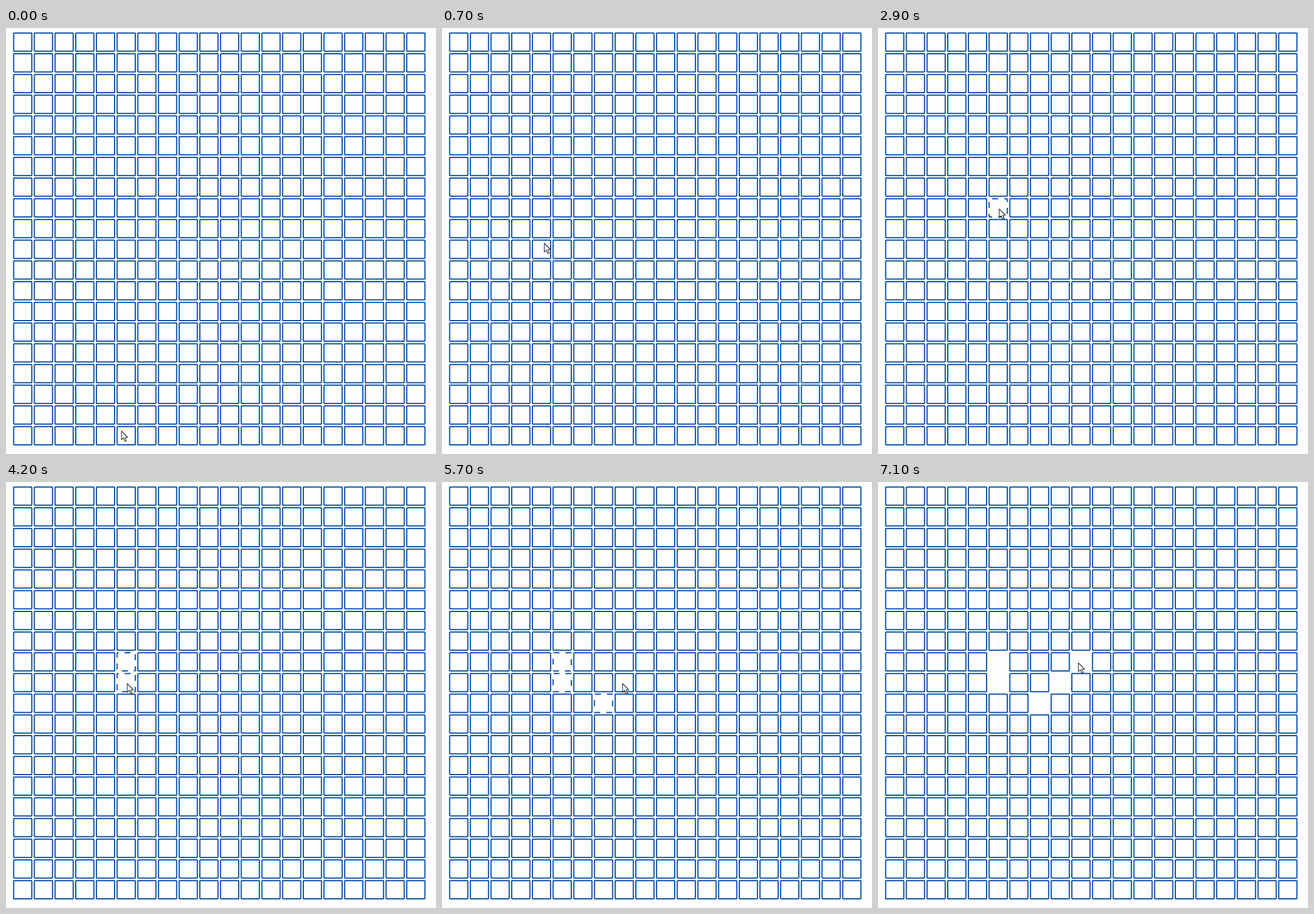
Animation, 752 px wide and 744 px high, one loop 8 s. Source, as an HTML page:

```html
<!DOCTYPE html>
<html lang="en">
<head>
<meta charset="utf-8">
<title>Cell grid</title>
<style>
  html, body { margin: 0; width: 100%; height: 100%; overflow: hidden; background: #fefefe; }
  svg { display: block; }
  .cell { fill: none; stroke: #004aa3; stroke-width: 2; }
  .cursor { fill: #fff; stroke: #222; stroke-width: 1.1; stroke-linejoin: round; }
</style>
</head>
<body>
<svg width="752" height="744" viewBox="0 0 752 744">
  <g id="grid"></g>
  <path id="cursor" class="cursor" d="M0 0V15.2L3.5 12L6.1 18L8.6 17L6 11H10.8Z"/>
</svg>
<script>
const LOOP = 8000, STEP = 100, MOVE = 500, VANISH = 7000;
const COUNT = 20, PITCH = 36.18, SIZE = 31.8;
const DASH = 11, DASH_SPEED = 0.0061;

const visits = [
  { column: 5, row: 8, arrive: 1300, click: 2100 },
  { column: 5, row: 9, arrive: 3800, click: 4200 },
  { column: 7, row: 10, arrive: 4800, click: 5200 },
  { column: 8, row: 9, arrive: 5700, click: 6100 },
  { column: 9, row: 8, arrive: 6400, click: 6800 }
];

const grid = document.getElementById('grid');
const cursor = document.getElementById('cursor');
const clamp = v => Math.max(0, Math.min(1, v));
const mix = (a, b, p) => a + (b - a) * p;
const ease = p => p * p * (3 - 2 * p);

function addCell(column, row) {
  const rect = document.createElementNS('http://www.w3.org/2000/svg', 'rect');
  const attributes = {
    class: 'cell', x: 13.4 + column * PITCH, y: 8.8 + row * PITCH,
    width: SIZE, height: SIZE, rx: 0.8, pathLength: DASH * 12
  };
  for (const name in attributes) rect.setAttribute(name, attributes[name]);
  grid.append(rect);
  return rect;
}

const cells = Array.from({ length: COUNT * COUNT },
  (_, i) => addCell(i % COUNT, Math.floor(i / COUNT)));

// The pointer enters from below, then visits each cell in turn.
function pointerAt(t) {
  const entry = ease(clamp(t / 700));
  let x = mix(202, 179, entry), y = mix(704, 376, entry);
  for (const { column, row, arrive } of visits) {
    const p = ease(clamp((t - arrive + MOVE) / MOVE));
    x = mix(x, 212 + (column - 5) * 34.6, p);
    y = mix(y, 316 + (row - 8) * 36, p);
  }
  return [x, y];
}

function render(t) {
  cursor.setAttribute('transform', `translate(${pointerAt(t)})`);
  const march = DASH_SPEED * (t - visits[0].click);
  for (const { column, row, click } of visits) {
    const { style } = cells[row * COUNT + column];
    style.strokeDasharray = t >= click ? DASH : 'none';
    style.strokeDashoffset = -march;
    style.opacity = 1 - 0.6 * (t >= VANISH) - 0.4 * (t > VANISH);
  }
}

const start = performance.now();
function tick() {
  const elapsed = (performance.now() - start) % LOOP;
  render(Math.floor(elapsed / STEP) * STEP);
  requestAnimationFrame(tick);
}
tick();
</script>
</body>
</html>
```
